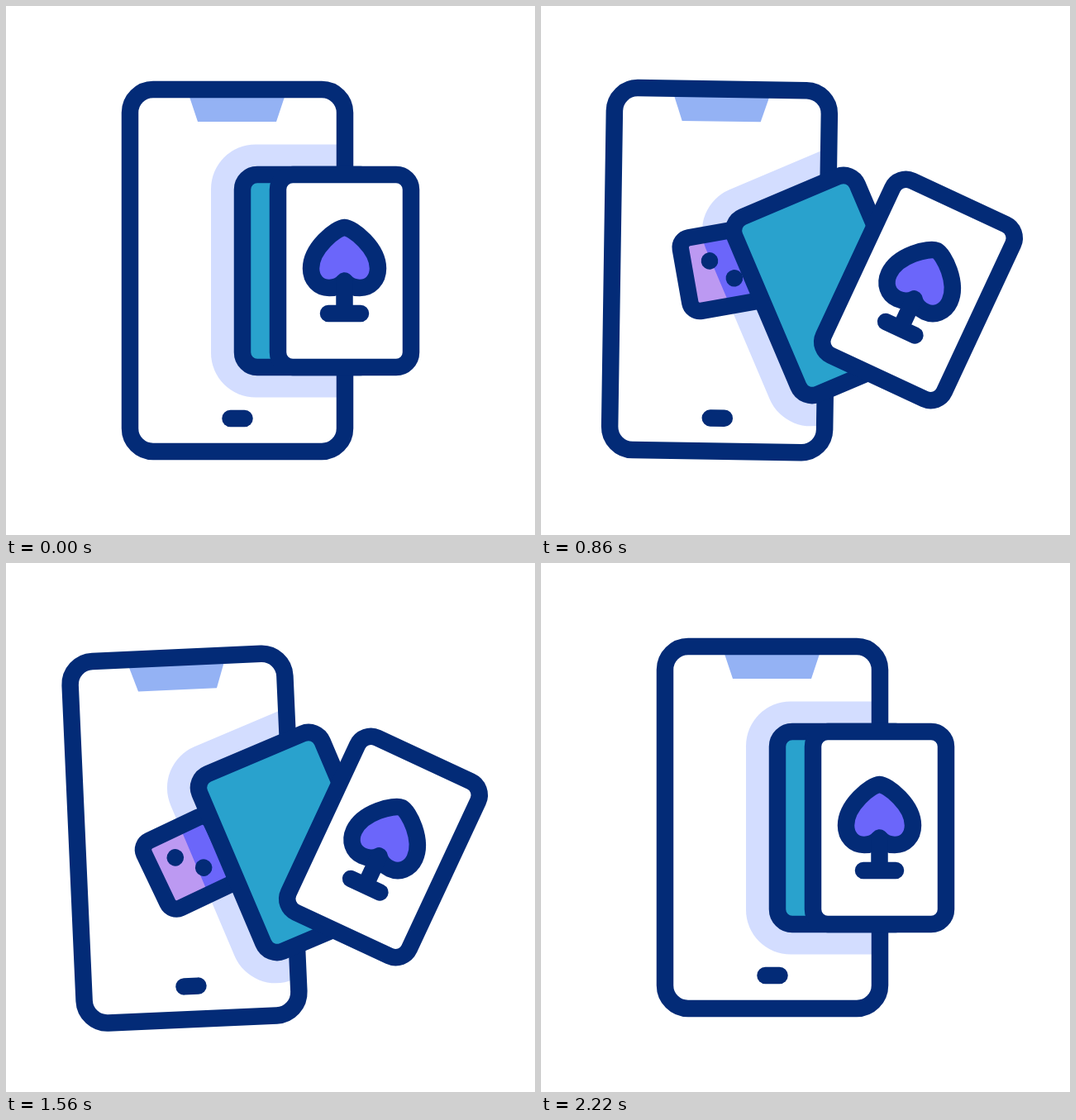
Recreate the animation shown at these times as an HTML page with a canvas. Size 640x640 px, loop 2.4 s.

```html
<!DOCTYPE html>
<html lang="en">
<head>
<meta charset="utf-8">
<title>Mobile card game</title>
<style>
html, body { margin: 0; width: 100%; height: 100%; overflow: hidden; background: #fff; }
canvas { display: block; }
</style>
</head>
<body>
<canvas id="stage" width="640" height="640"></canvas>
<script>
const ctx = document.getElementById('stage').getContext('2d');
const LOOP = 2400, START = 220, END = 2220;
const NAVY = '#032b77', TEAL = '#29a2cd', GLOW = '#d3ddff', NOTCH = '#94b2f4',
  VIOLET = '#6b66fa', LILAC = '#bc99f2', YELLOW = '#ffcb52';

const sine = p => (1 - Math.cos(Math.PI * p)) / 2;
const cubic = p => p < 0.5 ? 4 * p ** 3 : 1 - 4 * (1 - p) ** 3;
const clamp = (v, low, high) => Math.min(Math.max(v, low), high);

// Eased progress from 0 to 1 between two times.
const ramp = (t, from, to, ease = sine) => ease(clamp((t - from) / (to - from), 0, 1));

// Cosine that peaks at the given time and rests outside [from, to].
const wave = (t, peak, period, from, to) =>
  Math.cos(2 * Math.PI * (clamp(t, from, to) - peak) / period);

function poses(t) {
  const open = ramp(t, START, 620), close = ramp(t, 1600, 1920), fan = open - close;
  const tuck = ramp(t, 1960, END);
  const bounce = (43 + 62 * wave(t, 560, 800, START, 1760)) *
    (ramp(t, START, 410) - ramp(t, 1760, END));
  const shift = ramp(t, START, 530, cubic) - ramp(t, 1731, 2205, cubic);
  const roll = ramp(t, START, 555) - ramp(t, 1740, 2200);
  const rock = wave(t, 700, 600, 700, 1300) * ramp(t, START, 640);
  return {
    phone: {
      x: 280 - 64 * shift,
      y: 320 + 0.31 * bounce,
      angle: -7.5 * rock + 13.5 * ramp(t, 1300, 1930) - 6 * ramp(t, 1930, END)
    },
    die: {
      x: 345 - 126 * roll + 0.07 * bounce,
      y: 320 + bounce,
      angle: 89 - 144 * ramp(t, START, 1250) + 125 * ramp(t, 1380, 1940)
    },
    back: {
      x: 366.5 - 19.5 * open + 60.5 * close - 41 * tuck,
      y: 320.5 + 17.5 * fan,
      angle: -23 * fan
    },
    front: { x: 409.5 + 47 * fan, y: 320.5 + 23 * fan, angle: 25 * fan }
  };
}

// A centred rounded rectangle placed in a pose {x, y, angle}.
function box(pose, halfW, halfH, radius) {
  const shape = new Path2D(), placed = new Path2D();
  shape.roundRect(-halfW, -halfH, 2 * halfW, 2 * halfH, radius);
  placed.addPath(shape, new DOMMatrix().translate(pose.x, pose.y).rotate(pose.angle));
  return placed;
}

function within(pose, draw) {
  ctx.save();
  ctx.translate(pose.x, pose.y);
  ctx.rotate(pose.angle * Math.PI / 180);
  draw();
  ctx.restore();
}

function fill(path, color) {
  ctx.fillStyle = color;
  ctx.fill(path);
}

function outline(path, color = NAVY) {
  ctx.strokeStyle = color;
  ctx.stroke(path);
}

function fillInside(clip, path, color) {
  ctx.save();
  ctx.clip(clip);
  fill(path, color);
  ctx.restore();
}

const notch = new Path2D('M-58-210H57L47-180H-48Z');
const button = new Path2D('M-8.5 179H8.5');
const spade = new Path2D('M0-52.5C-10-52-40.5-28-40.5-3C-40.5 11-31 20.5-18.5 20.5' +
  'C-11 20.5-4 17 0 12C4 17 11 20.5 18.5 20.5C31 20.5 40.5 11 40.5-3C40.5-28 10-52 0-52.5Z');
const stem = new Path2D('M0 14V51.5M-19.5 51.5H19.5');

function drawPhone(phone, glow) {
  const body = box(phone, 130, 219, 28);
  fill(body, '#fff');
  fillInside(body, glow, GLOW);
  within(phone, () => fill(notch, NOTCH));
  outline(body);
  within(phone, () => outline(button));
}

function drawDie(die, glow) {
  const body = box(die, 45, 45, 12);
  fill(body, LILAC);
  fillInside(body, glow, VIOLET);
  outline(body);
  within(die, () => {
    for (const d of [-12.9, 12.9]) {
      const dot = new Path2D();
      dot.arc(d, d, 10.3, 0, 2 * Math.PI);
      fill(dot, NAVY);
    }
  });
}

function drawCard(pose, color) {
  const body = box(pose, 80.5, 116.5, 18);
  fill(body, color);
  outline(body);
}

function drawSpark(t, x, y, dx, dy) {
  const head = ramp(t, 1920, 2080), tail = ramp(t, 1970, 2130);
  if (head <= tail) return;
  const line = new Path2D();
  line.moveTo(x + dx * tail, y + dy * tail);
  line.lineTo(x + dx * head, y + dy * head);
  outline(line, YELLOW);
}

function draw(t) {
  const { phone, die, back, front } = poses(t);
  const glow = box(back, 118.5, 153, 54);
  ctx.fillStyle = '#fff';
  ctx.fillRect(0, 0, 640, 640);
  ctx.lineWidth = 20.5;
  ctx.lineCap = ctx.lineJoin = 'round';
  drawPhone(phone, glow);
  drawDie(die, glow);
  drawCard(back, TEAL);
  drawCard(front, '#fff');
  within(front, () => {
    fill(spade, VIOLET);
    outline(spade);
    outline(stem);
  });
  drawSpark(t, 511, 171.5, 8, -42);
  drawSpark(t, 530.5, 191, 30, -10);
}

function tick() {
  draw(performance.now() % LOOP);
  requestAnimationFrame(tick);
}
tick();
</script>
</body>
</html>
```
